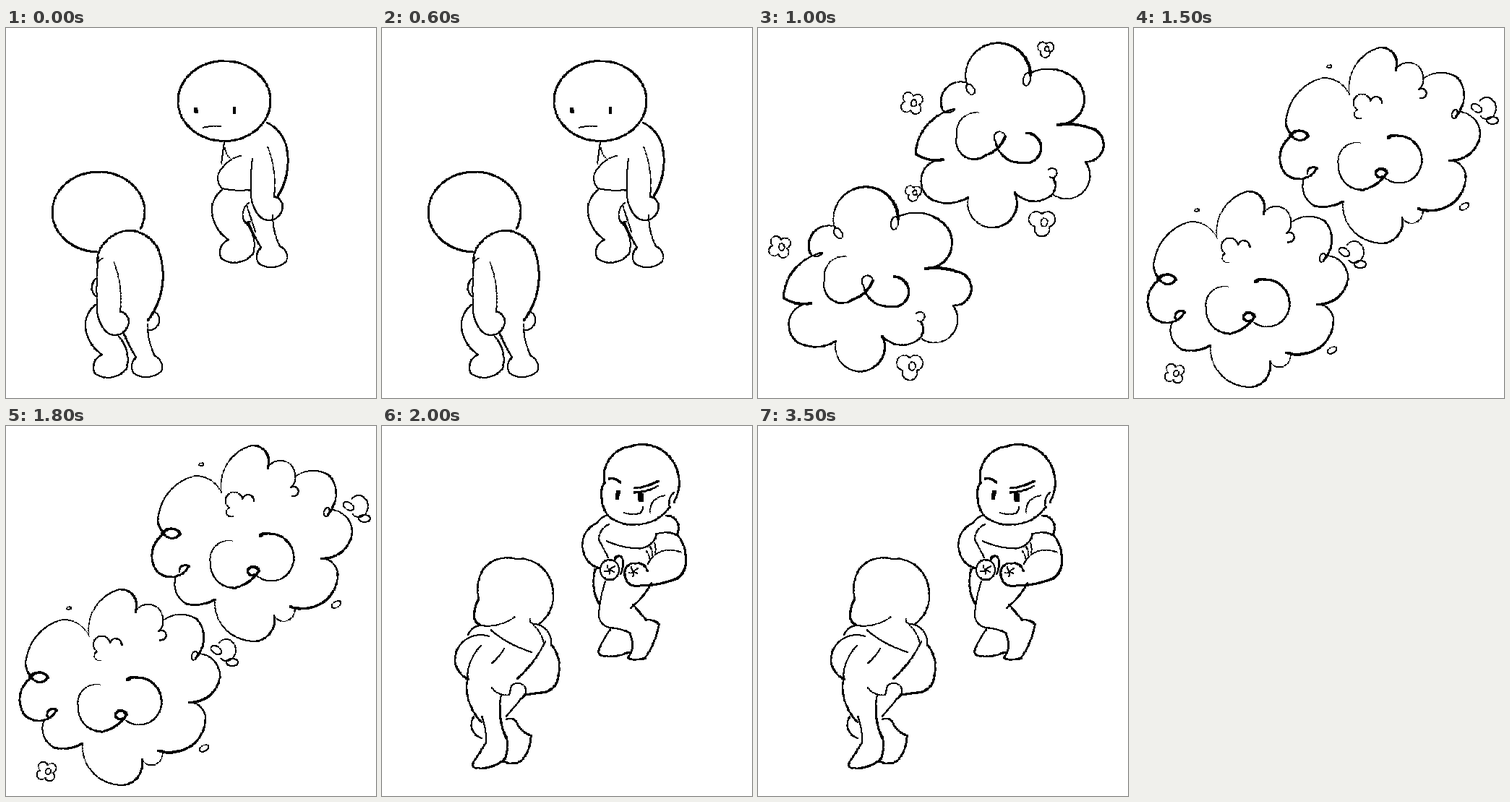
Animation, 512 px wide and 512 px high, one loop 4.5 s. Source, as an HTML page with a canvas:

```html
<!DOCTYPE html>
<html lang="en">
<head>
<meta charset="utf-8">
<title>Workout</title>
<style>
  html, body { margin: 0; height: 100%; overflow: hidden; background: #fff; }
  canvas { display: block; width: 100vw; height: 100vh; }
</style>
</head>
<body>
<canvas id="stage" width="512" height="512"></canvas>
<script>
const ctx = document.getElementById('stage').getContext('2d');
const LOOP = 4500;
let seed;

function random() {
  seed = (seed * 16807) % 2147483647;
  return seed / 2147483647;
}

// One dab of a rough, hard-edged pen.
function dab(x, y, width) {
  const size = Math.max(1, Math.round(width + (random() - 0.5) * 1.1));
  ctx.fillRect(Math.round(x - size / 2), Math.round(y - size / 2), size, size);
}

// Circular arc whose height is bulge * chord, on the left of the pen's travel.
function arc(x1, y1, bulge, x2, y2, from, to) {
  const dx = x2 - x1, dy = y2 - y1, chord = Math.hypot(dx, dy);
  const half = 2 * Math.atan(2 * bulge || 1e-4);
  const radius = 0.5 / Math.sin(half);
  const steps = Math.ceil(chord * half / Math.sin(half) * 1.3);
  for (let i = 0; i <= steps; i++) {
    const angle = (2 * i / steps - 1) * half;
    const along = 0.5 + radius * Math.sin(angle);
    const rise = radius * (Math.cos(angle) - Math.cos(half));
    dab(x1 + dx * along + dy * rise, y1 + dy * along - dx * rise, from + (to - from) * i / steps);
  }
}

// Chain of arcs: a start point, then bulge, x, y for every arc.
function trace(from, to, x, y, ...arcs) {
  const count = arcs.length / 3;
  for (let i = 0; i < count; i++) {
    const [bulge, nextX, nextY] = arcs.slice(3 * i, 3 * i + 3);
    const width = k => from + (to - from) * k / count;
    arc(x, y, bulge, nextX, nextY, width(i), width(i + 1));
    [x, y] = [nextX, nextY];
  }
}

function ring(width, x, y, rx, ry, tilt = 0, start = 0, end = 360) {
  const rad = Math.PI / 180, cos = Math.cos(tilt * rad), sin = Math.sin(tilt * rad);
  for (let angle = start; angle <= end; angle += 45 / Math.max(rx, ry)) {
    const u = rx * Math.cos(angle * rad), v = ry * Math.sin(angle * rad);
    dab(x + u * cos - v * sin, y + u * sin + v * cos, width);
  }
}

// Scalloped wisp with a curl in the middle.
function puff(x, y, r, lobes, turn) {
  const corner = i => {
    const angle = turn + i * 2 * Math.PI / lobes;
    return [x + r * 0.55 * Math.cos(angle), y + r * 0.55 * Math.sin(angle)];
  };
  for (let i = 0; i < lobes; i++) arc(...corner(i), 0.68, ...corner(i + 1), 1.3, 1.6);
  ring(1.4, x + r * 0.15, y, r * 0.22, r * 0.27);
}

function scribble(x, y, r) {
  for (let angle = 0.4; angle < 6; angle += 1.3) {
    const reach = r * (0.6 + 0.4 * random());
    trace(1.5, 1.5, x, y, 0.1, x + reach * Math.cos(angle), y + reach * Math.sin(angle));
  }
}

function at(x, y, draw) {
  ctx.save();
  ctx.translate(x, y);
  draw();
  ctx.restore();
}

function twice(draw) {
  draw();
  at(-183, 199, draw);
}

function slouchLimbs(hand, hip, ankle, armLength) {
  at(...hand, () => {
    trace(1.7, 2.2, -30, -armLength, -0.02, -32, -9, -0.1, -20, 28, -0.28, 11, 19, -0.22, 0, 0);
    trace(1.3, 1.5, -9, -69, 0.06, 0, 0);
  });
  at(...hip, () => {
    trace(2, 2, 0, 0, -0.11, -14, 26, -0.13, 9, 69, -0.22, -1, 95, -0.2, 43, 88, -0.13, 32, 44);
  });
  at(...ankle, () => {
    trace(1.6, 2.2, 16, -46, -0.06, 26, -2, 0.2, 35, 19, 0.17, -3, 22, 0.2, 0, 0, 0.02, -18, -36);
  });
}

function slouchFront() {
  ring(2.4, 302, 101, 64, 55.5);
  trace(5, 5, 262, 112, 0, 263, 115);
  trace(4, 4, 316, 111, 0, 316, 117);
  trace(1.6, 1.2, 272, 138, 0.04, 297, 136);
  slouchLimbs([371, 233], [299, 224], [353, 304], 53);
  // Back, neck and belly
  trace(2, 3, 361, 131, 0.13, 389, 170, 0.09, 376, 233);
  trace(2, 1.5, 302, 157, 0, 298, 188);
  trace(1.5, 1.3, 303, 166, -0.1, 311, 181);
  trace(1.3, 2, 325, 177, -0.1, 300, 193, -0.22, 299, 222, -0.04, 337, 224);
  trace(1.5, 1.5, 336, 242, -0.2, 331, 270, 0, 338, 268);
  trace(1.6, 1.6, 333, 245, 0, 345, 282);
}

function slouchBack() {
  ring(2.4, 128, 254.5, 64, 55.5, 0, 90, 385);
  slouchLimbs([158, 392], [124, 383], [180, 456], 76);
  // Back and far hand
  trace(2.2, 2.8, 128, 311, 0.15, 172, 280, 0.18, 215, 322, 0.11, 196, 405);
  trace(2, 1.2, 128, 311, -0.04, 126, 325, 0, 134, 318);
  trace(2, 2, 124, 347, -0.22, 124, 371);
  trace(1.5, 2, 205, 392, 0.42, 196, 418);
}

function firstCloud() {
  // Outline, clockwise from the top
  trace(1.3, 3.6, 289, 78, 0.57, 377, 65);
  ring(1.6, 372, 71, 5, 9, 10);
  trace(1.8, 3, 378, 62, 0.15, 438, 70, 0.36, 415, 134);
  trace(4, 2.2, 415, 134, 0.06, 458, 138, 0.48, 453, 185);
  trace(2.2, 1.3, 453, 185, 0.42, 409, 231);
  trace(2.3, 2, 408, 207, 0.2, 405, 232, 0.2, 355, 227);
  trace(3, 1.2, 355, 227, 0.71, 291, 234);
  trace(2.3, 2, 291, 234, 0.14, 238, 236, 0.37, 256, 182);
  trace(3.4, 1.3, 256, 182, 0.1, 218, 174, 0.17, 272, 112, 0.3, 255, 112);
  trace(3, 1.3, 255, 112, 0.32, 290, 76);
  ring(1.5, 294, 85, 5, 8, -30);
  // Curls
  trace(2, 1.3, 402, 196, 1.1, 403, 206);
  trace(1, 3.2, 305, 117, -0.25, 275, 150, -0.36, 315, 176, -0.12, 342, 150);
  trace(1.4, 3.2, 342, 150, -0.7, 329, 157, -0.2, 365, 186, -0.57, 371, 145);
  puff(398, 29, 13, 3, 0.6);
  puff(213, 104, 18, 4, 0.2);
  puff(393, 269, 21, 3, -1.57);
}

function secondCloud() {
  // Outline, clockwise from the top
  trace(1, 3, 298, 92, 0.19, 340, 27, 0.28, 362, 58);
  trace(1.5, 2, 362, 58, 0.4, 400, 70, 0.15, 394, 85, 0.8, 396, 97);
  trace(1.5, 2.5, 400, 70, 0.15, 447, 68, 0.2, 445, 122);
  ring(1.6, 444, 119, 4, 6, 20);
  trace(1.4, 3, 447, 116, 0.22, 479, 148, 0.2, 436, 183);
  trace(1.5, 3.4, 436, 183, 0.2, 459, 205, 0.12, 440, 243, 0.12, 393, 250);
  trace(1.3, 1.3, 399, 251, 0.45, 371, 262);
  trace(2.6, 1.2, 371, 262, 0.28, 335, 297, 0.2, 289, 240);
  trace(2.8, 1.6, 289, 240, 0.1, 250, 246, 0.2, 236, 207);
  trace(2.4, 2.4, 217, 150, -0.2, 208, 200, -0.26, 253, 194, -0.35, 240, 202);
  trace(1, 3.4, 298, 92, -0.15, 262, 69, -0.15, 212, 120, -0.15, 218, 148, -0.3, 241, 149, -0.3, 216, 150);
  // Curls
  trace(1, 3, 313, 159, -0.27, 283, 190, -0.22, 317, 224, -0.1, 350, 200);
  trace(3.4, 2.4, 350, 200, -0.35, 334, 201, -0.3, 345, 205);
  trace(1.4, 3.8, 345, 205, -0.33, 398, 185, -0.22, 365, 149, -0.1, 351, 152);
  trace(1.2, 2.2, 314, 125, 0.5, 309, 113, 0.75, 327, 101, 0.45, 343, 104);
  // Wisps
  ring(1.4, 270, 53, 3, 2);
  ring(1.5, 474, 111, 8, 5, 30);
  ring(1.5, 488, 111, 13, 15, 0, -140, 130);
  ring(1.7, 496, 128, 8, 5);
  ring(1.5, 457, 247, 7, 4, -30);
}

function strongFront() {
  // Head
  trace(2.5, 2.3, 308, 78, 0.22, 345, 28, 0.2, 407, 58, 0.12, 404, 105);
  trace(2, 2.3, 404, 92, -0.15, 398, 112, 0.12, 355, 136, 0.1, 315, 126, 0.1, 304, 100, 0.1, 308, 78);
  trace(3.4, 2.4, 314, 73, 0.15, 330, 79);
  trace(2.4, 3, 349, 86, -0.06, 382, 76);
  trace(3, 1.6, 349, 92, -0.06, 382, 83);
  trace(5.5, 5, 327, 91, 0, 325, 99);
  trace(8, 7, 358, 97, 0, 358, 101);
  trace(1.7, 1.7, 334, 120, -0.06, 357, 121, -0.1, 361, 112);
  trace(1.4, 1.7, 391, 96, -0.05, 376, 103, -0.1, 371, 120);
  // Chest and arms
  trace(1.8, 2.5, 313, 123, -0.1, 298, 134, -0.2, 279, 175, -0.15, 302, 197);
  trace(1.8, 1.8, 314, 136, -0.15, 300, 157, 0, 313, 182);
  trace(1.8, 2.2, 311, 159, -0.05, 350, 169, -0.2, 380, 150);
  trace(2, 2.2, 393, 124, 0.3, 408, 150);
  trace(1.8, 3, 378, 150, 0.1, 409, 151, 0.1, 420, 185, 0.15, 408, 211);
  trace(2.8, 2.2, 408, 211, 0.05, 355, 221, 0.25, 336, 205, 0.25, 350, 190, 0.2, 367, 200);
  trace(1.5, 1.7, 368, 191, 0.1, 385, 174, 0.1, 414, 175);
  for (let i = 0; i < 3; i++) trace(1.6, 1.6, 365 + 6 * i, 172 - 5 * i, 0.08, 370 + 4 * i, 183 - 4 * i);
  // Fists
  ring(2.1, 315, 199, 13, 14);
  trace(2.6, 2, 322, 185, 0.5, 333, 186, 0.08, 330, 205);
  scribble(315, 200, 9);
  scribble(348, 202, 9);
  // Waist, legs and feet
  trace(2.4, 2.4, 295, 198, -0.1, 301, 247);
  trace(1.6, 2.2, 309, 215, -0.03, 300, 260, -0.2, 316, 279, 0.05, 344, 287);
  trace(2.2, 2, 373, 217, 0.05, 344, 252);
  trace(2.2, 2.4, 347, 247, 0, 365, 268, 0.1, 383, 274, 0.06, 364, 321, 0.1, 340, 321, -0.15, 343, 288);
  trace(2, 2.2, 316, 281, -0.02, 300, 309, -0.3, 308, 318, -0.08, 341, 313);
}

function strongBack() {
  // Head and neck
  trace(2.5, 2, 137, 276, 0.2, 128, 256, 0.05, 134, 240, 0.1, 140, 198, 0.15, 185, 184, 0.21, 236, 225, 0.15, 217, 274);
  trace(2, 1.5, 119, 289, 0.15, 137, 276, -0.1, 184, 264);
  trace(1.5, 2, 205, 266, -0.3, 212, 274, 0.2, 234, 302);
  // Arms
  trace(1.8, 2.5, 148, 291, -0.2, 103, 312, -0.2, 119, 350);
  trace(1.7, 2.4, 137, 304, -0.1, 118, 350, -0.12, 138, 410);
  trace(2.2, 3, 234, 302, 0.12, 244, 345, 0.2, 220, 369, 0, 197, 372);
  // Back
  trace(1.6, 1.9, 150, 282, -0.05, 207, 313);
  trace(1.5, 2, 169, 308, 0.05, 152, 328);
  trace(1.7, 2.6, 226, 298, 0.05, 187, 350);
  trace(1.5, 1.5, 209, 275, 0.1, 224, 303);
  trace(1.6, 2, 152, 362, -0.15, 176, 372, 0, 179, 360, 0.4, 199, 370, 0.1, 191, 378);
  // Legs and feet
  trace(2.2, 2.8, 165, 372, -0.08, 172, 432);
  trace(1.7, 2, 197, 372, 0, 172, 402);
  trace(2, 2.4, 138, 402, 0.05, 144, 438, 0, 126, 466, -0.3, 130, 473, -0.12, 170, 460, -0.08, 172, 430);
  trace(2, 2.2, 127, 402, -0.25, 138, 432);
  trace(2.2, 2.3, 172, 406, 0.25, 187, 412, -0.1, 206, 428, 0.1, 192, 464, 0.12, 168, 464);
}

const scenes = [
  { end: 1000, draw() { slouchFront(); slouchBack(); } },
  { end: 1500, draw() { twice(firstCloud); } },
  { end: 2000, draw() { twice(secondCloud); puff(56, 478, 16, 4, 0.2); } },
  { end: LOOP, draw() { strongFront(); strongBack(); } }
];

const start = performance.now();
let shown;

function render(now) {
  const time = Math.max(0, now - start) % LOOP;
  const scene = scenes.find(s => time < s.end);
  if (scene !== shown) {
    shown = scene;
    seed = 7;
    ctx.fillStyle = '#fff';
    ctx.fillRect(0, 0, 512, 512);
    ctx.fillStyle = '#000';
    scene.draw();
  }
  requestAnimationFrame(render);
}
render(start);
</script>
</body>
</html>
```
